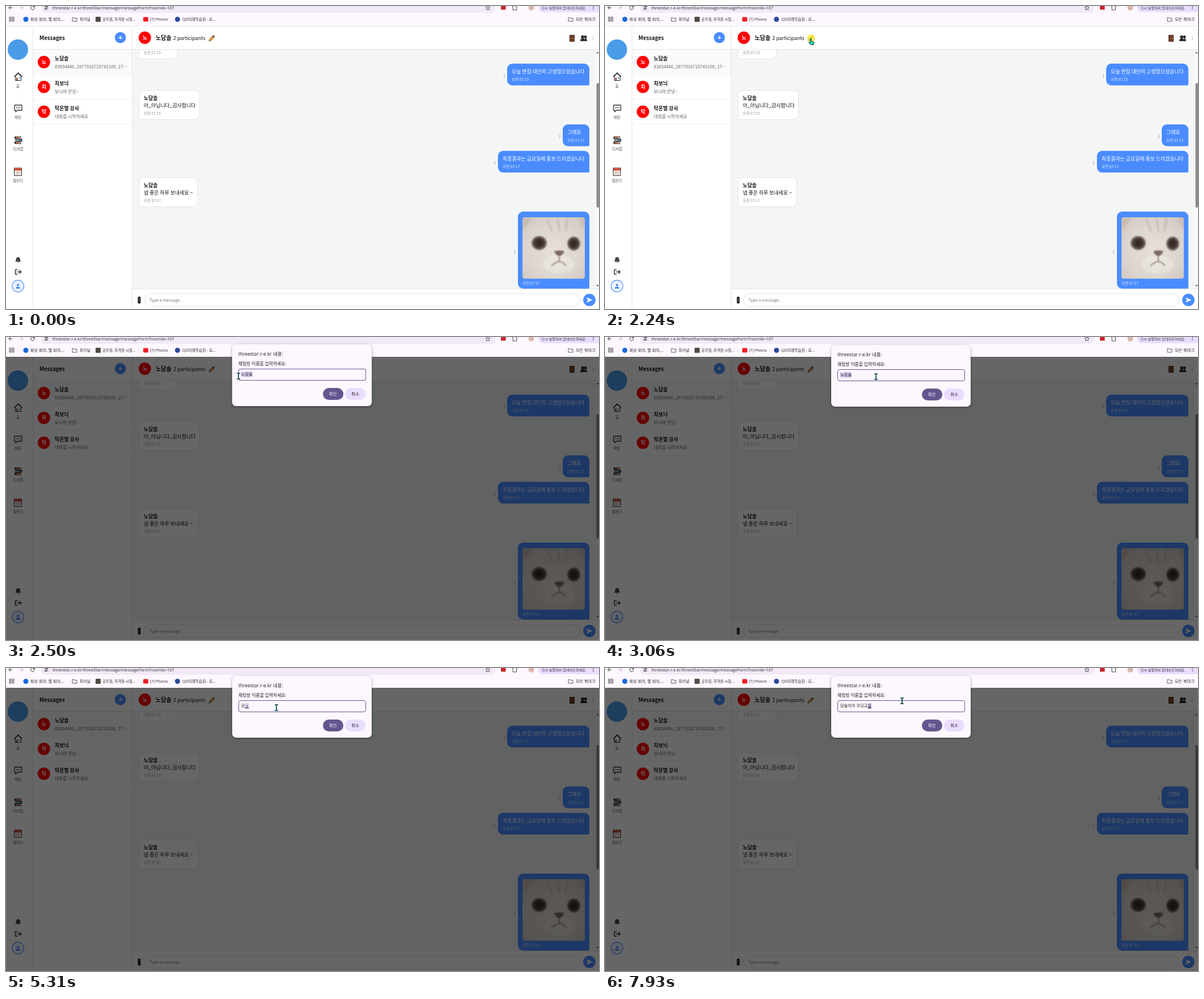
These frames come from a looping animation (1046 by 535 pixels, 8000 ms). An HTML page:

```html
<!DOCTYPE html>
<html>
<head>
<meta charset="utf-8">
<title>Chat room rename</title>
<style>
html, body { margin: 0; width: 100%; height: 100%; overflow: hidden; background: #fff; }
svg { display: block; position: absolute; left: 0; top: 0; }
body, text { font-family: 'Noto Sans CJK KR', 'Noto Sans', sans-serif; }
text { font-size: 8.88px; fill: #111; }
.bar text, #dialog { font-family: 'Open Sans', 'Noto Sans CJK KR', sans-serif; }
.bar text { font-size: 6.8px; fill: #2b2930; }
.b { font-weight: 700; }
.mid { text-anchor: middle; }
.sub { font-size: 7.75px; fill: #666; }
.w text { fill: #fff; }
.time text { font-size: 6.6px; fill: #8b8f94; }
.w .time text { fill: #e6efff; }
.nav text { font-size: 6.6px; fill: #555; text-anchor: middle; }
.line { fill: none; stroke: #333; stroke-linecap: round; stroke-linejoin: round; }
.rule { stroke: #e3e5e8; }
.blue { fill: #4a8cff; }
.in { fill: #fff; stroke: #dfe2e5; }
#dialog { position: absolute; left: 399px; top: 14px; width: 246px; height: 109px; border-radius: 7px;
  background: #fef7ff; color: #1d1b20; box-shadow: 0 1px 4px #0006; font-size: 7.4px; line-height: 10px; }
#dialog > * { position: absolute; white-space: pre; box-sizing: border-box; }
#field { left: 10.5px; top: 43px; width: 225px; height: 21px; border: 1.5px solid #65558f; border-radius: 4px;
  padding: 4px 4.5px; font-size: 7.2px; line-height: 9.5px; }
#field span { display: inline-block; height: 9.5px; vertical-align: top; }
#last { text-decoration: underline; background: #ddcdf5; }
#caret { width: 1px; background: #1d1b20; }
.btn { top: 76.5px; width: 36px; height: 21px; border-radius: 11px; text-align: center; line-height: 20px; }
</style>
</head>
<body>
<svg width="1046" height="535">
<defs>
  <g id="dots"><circle cy="-2.4" r=".65"/><circle r=".65"/><circle cy="2.4" r=".65"/></g>
  <path id="folder" d="M-4-3h3l1 1h4v5.5h-8z" fill="none" stroke="#49454f" stroke-width=".9"/>
  <radialGradient id="fur" cx=".5" cy=".55" r=".75">
    <stop offset="0" stop-color="#e6dfda"/><stop offset=".6" stop-color="#dcd5cf"/><stop offset="1" stop-color="#cac2bb"/>
  </radialGradient>
  <radialGradient id="eye"><stop offset="0" stop-color="#2b211e"/><stop offset=".65" stop-color="#493b36"/><stop offset="1" stop-color="#8d8078"/></radialGradient>
  <filter id="soft"><feGaussianBlur stdDeviation="1.2"/></filter>
  <clipPath id="chat"><path d="M223 77h823v422h-823z"/></clipPath>
  <clipPath id="photo"><rect x="911" y="373" width="110" height="108.5" rx="4"/></clipPath>
</defs>

<!-- browser bar -->
<g class="bar">
  <path d="M0 0h1046v35H0z" fill="#fef7ff"/>
  <path d="M62 0h801v6q-1 6-8 6H70q-7 0-8-6z" fill="#f1e9f6"/>
  <path d="M939 0h107v11H946q-6 0-7-7z" fill="#eaddff"/>
  <g class="line" stroke-width="1">
    <path d="M11 3H5m3-3L5 3l3 3"/>
    <path d="M24 3h6m-3-3 3 3-3 3" stroke="#bbb4c0"/>
    <path d="M50 1.5a3.4 3.4 0 1 0 .3 2.500M50.500-.5v2.500H48"/>
    <path d="M68 1.500h3m2 0h1M68 5h1m2 0h3"/><circle cx="72" cy="1.500" r="1"/><circle cx="70" cy="5" r="1"/>
    <path d="m850-.8 1.200 2.600 2.800.3-2.100 1.900.6 2.800-2.500-1.400-2.500 1.400.6-2.800-2.100-1.900 2.800-.3z" stroke-width=".8"/>
    <path d="M894 0h2q1-2 2 0h2.500v2q2 1 0 2v3H894V4.800q2-1 0-2z" stroke-width=".9"/>
  </g>
  <rect x="873" y="-1" width="8.500" height="7.500" rx="1" fill="#c9252b"/>
  <circle cx="926.500" cy="3" r="5" fill="#d9b8ae"/>
  <text x="82" y="5.800" style="font-size:7.330px">threestar.r-e.kr/threeStar/message/messageForm?roomId=107</text>
  <text x="944.500" y="5.500" style="font-size:6.200px">다시 실행하여 업데이트하세요.</text>
  <use href="#dots" x="1036" y="3"/>
  <path d="M6 19.500h3v3H6zm5 0h3v3h-3zm-5 4.500h3v3H6zm5 0h3v3h-3z" fill="none" stroke="#49454f" stroke-width=".9"/>
  <circle cx="35" cy="23.500" r="4.500" fill="#1769d9"/>
  <text x="43" y="26" style="font-size:7.100px">화상 회의, 웹 회의,...</text>
  <use href="#folder" x="121" y="23.500"/><text x="130" y="26">파이널</text>
  <rect x="158" y="19" width="9" height="9" rx="1" fill="#4d4d45"/>
  <text x="170" y="26" style="font-size:6.500px">공무원, 자격증 시험...</text>
  <rect x="242" y="19.500" width="9" height="8" rx="2" fill="#f01d24"/>
  <text x="254" y="26">(7) Plivora</text>
  <circle cx="302.500" cy="23.500" r="4.500" fill="#2c49a0"/>
  <text x="311" y="26">QD미래학습원 - 로...</text>
  <use href="#folder" x="996" y="23.500"/><text x="1005" y="26" style="font-size:7.200px">모든 북마크</text>
</g>

<!-- navigation -->
<path d="M0 35h1046v500H0z" fill="#fff"/>
<circle cx="21" cy="77" r="18" fill="#4a9be8"/>
<g class="nav">
  <path d="M16.500 124v7.500h10V124l-5-5z" fill="#fff" stroke="#222"/>
  <path d="m14.500 125 7-7 7 7" fill="none" stroke="#222" stroke-width="1.400"/>
  <path d="M18 126.500h2.500v4.500H18z" fill="#8f4a30"/><path d="M22.500 126h2.500v2.500h-2.500z" fill="#58acd6"/>
  <text x="21" y="143.500">홈</text>
  <path d="M15 175h13v9h-8l-3 3v-3h-2z" class="line" stroke-width="1.300"/>
  <g fill="#222"><circle cx="18.500" cy="179.500" r=".9"/><circle cx="21.500" cy="179.500" r=".9"/><circle cx="24.500" cy="179.500" r=".9"/></g>
  <text x="21" y="199">채팅</text>
  <path d="M15 230.500h12v4H15zm1.500 4.500h12v4h-12zM15 239.500h12v4H15z" fill="#222"/>
  <path d="M17 231.500h9v2h-9zM17 240.500h9v2h-9z" fill="#d7703d"/><path d="M18 236h9v2h-9z" fill="#4f9bc9"/>
  <path d="M22 232.500h5m-10 4.500h5m0 4.500h5" stroke="#fff"/>
  <text x="21.500" y="255">티셔럽</text>
  <path d="M14.500 286h13v13.500h-13z" fill="#f5eee9" stroke="#332c2b"/>
  <path d="M15 286.500h12v4H15z" fill="#d84a36"/>
  <path d="M17 293h8.500m-8.500 2h8.500m-8.500 2h6" stroke="#b9958c" stroke-dasharray="1.500 .8"/>
  <text x="21" y="311">캘린더</text>
</g>
<path d="M16 451.500q1.800-1.500 1.800-5 0-2.500 3-3 .5-1 1 0 3 .5 3 3 0 3.500 1.700 5zM20 452.500h3q-1.500 2-3 0z" fill="#444"/>
<path d="M20 465.500h-3.500v8H20m0-4h6.500m-2.500-2.800 2.800 2.800-2.800 2.800" class="line" stroke-width="1.500"/>
<circle cx="21.200" cy="494.500" r="10.400" fill="#edf4ff" stroke="#4a8cff" stroke-width="1.100"/>
<g class="blue"><circle cx="21.200" cy="492.500" r="2.100"/><path d="M17.200 499q0-3.500 4-3.500t4 3.500z"/></g>

<!-- room list -->
<path d="M48 77h174v44H48z" fill="#fafafb"/>
<text x="59" y="60" class="b" style="font-size:9.600px">Messages</text>
<circle cx="201.700" cy="55.800" r="9.800" class="blue"/>
<path d="M198.400 55.800h6.600m-3.300-3.300v6.600" stroke="#fff" stroke-width="1.200"/>
<g fill="#f00"><circle cx="66.900" cy="99" r="10.900"/><circle cx="66.900" cy="142.800" r="10.900"/><circle cx="66.900" cy="186.700" r="10.900"/><circle cx="244.900" cy="56" r="10.900"/></g>
<g class="w b mid"><text x="67" y="102.300">노</text><text x="67" y="146.300">차</text><text x="67" y="190.300">탁</text><text x="245" y="59.300">노</text></g>
<g class="b"><text x="86" y="95.500">노담솔</text><text x="86" y="139.500">차보늬</text><text x="86" y="183.500">탁온별 강사</text></g>
<text x="86" y="110" class="sub">83854446_2877016725745100_17⋯</text>
<text x="86" y="154" class="sub">보늬야 안녕~</text>
<text x="86" y="197.500" class="sub">대화를 시작하세요</text>

<!-- messages -->
<path d="M223 77h823v422H223z" fill="#f4f6f6"/>
<g clip-path="url(#chat)">
  <g class="in">
    <path d="M234.500 60h68v24.500a9 9 0 0 1-9 9h-57a2 2 0 0 1-2-2z"/>
    <path d="M243.500 149h89a9 9 0 0 1 9 9v33.500a9 9 0 0 1-9 9h-96a2 2 0 0 1-2-2V158a9 9 0 0 1 9-9z"/>
    <path d="M243.500 302.800h86a9 9 0 0 1 9 9v33.500a9 9 0 0 1-9 9h-93a2 2 0 0 1-2-2v-40.500a9 9 0 0 1 9-9z"/>
  </g>
  <g class="blue">
    <path d="M893 101.800h127a9 9 0 0 1 9 9v27.400a2 2 0 0 1-2 2H893a9 9 0 0 1-9-9v-20.400a9 9 0 0 1 9-9z"/>
    <path d="M991 209h29a9 9 0 0 1 9 9v27.400a2 2 0 0 1-2 2h-36a9 9 0 0 1-9-9V218a9 9 0 0 1 9-9z"/>
    <path d="M876.800 255.700H1020a9 9 0 0 1 9 9v27.400a2 2 0 0 1-2 2H876.800a9 9 0 0 1-9-9v-20.400a9 9 0 0 1 9-9z"/>
    <path d="M912 363h108a9 9 0 0 1 9 9v125a2 2 0 0 1-2 2H912a9 9 0 0 1-9-9V372a9 9 0 0 1 9-9z"/>
  </g>
  <g class="time"><text x="243" y="85">오전 07:15</text><text x="243" y="192">오전 07:15</text><text x="243" y="346">오전 07:17</text></g>
  <g class="b"><text x="243" y="165.500">노담솔</text><text x="243" y="319.500">노담솔</text></g>
  <text x="243" y="178.500">아,,아닙니다,,감사합니다</text>
  <text x="243" y="332.500">넵 좋은 하루 보내세요 ~</text>
  <g class="w">
    <text x="892" y="118.500">오늘 면접 대단히 고생많으셨습니다</text><text x="990" y="226">그래요</text><text x="876" y="272.500">최종결과는 금요일에 통보 드리겠습니다</text>
    <g class="time"><text x="892" y="132">오전 07:15</text><text x="990" y="239.500">오전 07:17</text><text x="876" y="286">오전 07:17</text><text x="911" y="491.500">오전 07:17</text></g>
  </g>
  <g fill="#666"><use href="#dots" x="879" y="123"/><use href="#dots" x="977" y="230"/><use href="#dots" x="862" y="277"/><use href="#dots" x="897" y="433.500"/></g>
  <g clip-path="url(#photo)">
    <path d="M911 373h110v109H911z" fill="url(#fur)"/>
    <g filter="url(#soft)">
      <path d="M911 373h16l-7 14-9 8zm110 0h-9l3 13 6 6z" fill="#cbbcb3"/>
      <path d="M955 376l8 22m10-24 3 24m14-24-3 24" stroke="#bdb6b1" stroke-width="4" fill="none" opacity=".6"/>
      <ellipse cx="975" cy="456" rx="28" ry="16" fill="#efe9e5" opacity=".6"/>
      <g fill="url(#eye)"><ellipse cx="940.500" cy="418.500" rx="13.500" ry="12.500"/><ellipse cx="1001.500" cy="419.500" rx="11.500" ry="12.500"/></g>
    </g>
    <g filter="url(#soft)">
      <path d="M967 433q9-3 18 0-3 7-9 9-6-2-9-9z" fill="#7d6861"/>
      <path d="M976 441v10m-14 8q7-7 14-8 7 1 12 8" fill="none" stroke="#9b8982" stroke-width="2"/>
    </g>
  </g>
</g>
<path d="M1040 77h6v422h-6z" fill="#fafafa"/>
<rect x="1041.500" y="136" width="4.500" height="220" rx="2" fill="#8b8b8b"/>
<path d="m1041 83.500 2.500-3 2.500 3zm0 409 2.500 3 2.500-3z" fill="#666"/>

<!-- room header and message field -->
<text x="264" y="60" class="b" style="font-size:10.100px">노담솔</text>
<text x="295" y="60">2 participants</text>
<path d="m358 62 1-3.500 6-6 2.500 2.500-6 6z" fill="#f0a23a" stroke="#47301f" stroke-width=".8"/>
<path d="m364 53.500 1.200-1.200q1.500-.7 2.700 1.300l-1.300 1.500z" fill="#df6b77" stroke="#47301f" stroke-width=".7"/>
<path d="M994.500 51.500h8v11h-8z" fill="#8b4d2d" stroke="#38221b"/><path d="M996.500 53.500h4v3h-4zm0 4.500h4v3h-4z" fill="#643420"/><circle cx="1001" cy="57.500" r=".8" fill="#f1b84b"/>
<g fill="#292929"><circle cx="1017" cy="54.500" r="2.700"/><circle cx="1022" cy="54.500" r="2.500"/><path d="M1013 62q0-5 4.500-5t4 5zm8.500 0v-5q3.500 0 3.500 5z"/></g>
<use href="#dots" x="1036" y="57.500" fill="#777"/>
<path d="M47.500 35v500M222.500 35v500M48 76.500h998M223 499.500h823" class="rule"/>
<path d="M48 120.500h174M48 164.500h174M48 208.500h174" stroke="#f0f1f3"/>
<path d="M0 35.500h1046" stroke="#ece6ef"/>
<rect x="232.500" y="513" width="5" height="12.500" rx="2.500" fill="#222"/><path d="M234 517h2m-2 2h2m-2 2h2" stroke="#888" stroke-width=".7"/>
<rect x="244.500" y="508" width="768" height="22" rx="11" class="in"/>
<text x="253" y="522" style="font-size:7.300px;fill:#777">Type a message...</text>
<circle cx="1029" cy="519" r="10.900" class="blue"/><path d="m1024.500 514.500 10 4.500-10 4.500 1-3.700 4-.8-4-.8z" fill="#fff"/>
<path id="scrim" d="M0 35h1046v500H0z" opacity=".6"/>
</svg>

<div id="dialog">
  <div style="left:11px;top:12px;font-size:8.400px">threestar.r-e.kr 내용:</div>
  <div style="left:11px;top:28.500px;font-size:7.750px">채팅방 이름을 입력하세요:</div>
  <div id="field"><span id="done"></span><span id="last"></span><span id="caret"></span></div>
  <div class="btn" style="left:159.500px;background:#65558f;color:#fff">확인</div>
  <div class="btn" style="left:199px;background:#eaddff">취소</div>
</div>

<svg width="1046" height="535" style="pointer-events:none">
  <circle id="click" cx="363.500" cy="57" r="7" fill="#ffeb3b" opacity=".8"/>
  <g id="pointer" stroke="#10302d" stroke-width=".9" stroke-linejoin="round" fill="#22d3b5">
    <path id="arrow" d="M0 0v10l2.300-2 1.700 3.500 1.700-.8L4.200 7.400h3.300z"/>
    <path id="hand" d="M-1 1q1-2 2 0v4l4 1q1 .5.700 2l-.9 3.500H0L-3.500 7.500q.4-1.800 2.500 0z"/>
    <path id="beam" d="M-3-5h2l1 .7 1-.7h2m-6 10h2l1-.7 1 .7h2M0-4.500v9" fill="none" stroke="#0b4a45" stroke-width="1.700"/>
  </g>
</svg>

<script>
const LOOP = 8000, OPEN = 2380;
const $ = id => document.getElementById(id);
const show = (id, on) => { $(id).style.display = on ? '' : 'none'; };
const within = (t, a, b) => t >= a && t < b;

// time, x, y of the pointer's hot spot
const path = [
  [210, 1039, 457], [440, 945, 352], [700, 825, 262], [970, 872, 204],
  [1330, 650, 150], [1780, 369, 68], [1870, 364, 64], [2240, 363, 57],
  [2379, 363, 57], [2380, 371, 59], [2500, 410, 69], [3060, 478, 70],
  [3260, 478, 70], [3460, 474.5, 69.5], [3610, 477, 70], [7929, 477, 70], [7930, 524, 58]
];

// time, characters kept from the start, characters added (jamo are composed step by step)
const keys = [
  [0, 0, '노담솔'], [4380, 2, ''], [4580, 1, ''], [4780, 0, ''],
  [4980, 0, 'ㄷ'], [5050, 0, '다'], [5130, 0, '담'],
  [5310, 1, 'ㅅ'], [5410, 1, '소'], [5510, 1, '솔'],
  [5660, 2, 'ㅇ'], [5730, 2, '이'],
  [5910, 3, 'ㅇ'], [6000, 3, '으'], [6090, 3, '의'], [6190, 4, ' '],
  [6280, 5, 'ㅋ'], [6380, 5, '코'], [6530, 5, '콛'], [6600, 5, '코디'], [6670, 6, '딩'],
  [6940, 7, 'ㄱ'], [7050, 7, '교'], [7160, 7, '굣'], [7270, 7, '교시'], [7480, 8, '실']
];

function pointerAt(t) {
  const i = path.findIndex(p => p[0] > t);
  if (i < 0) return path[path.length - 1].slice(1);
  if (i === 0) return path[0].slice(1);
  const [t0, x0, y0] = path[i - 1], [t1, x1, y1] = path[i];
  const k = (t - t0) / (t1 - t0);
  return [x0 + (x1 - x0) * k, y0 + (y1 - y0) * k];
}

function drawField(t) {
  let text = '';
  for (const [at, keep, add] of keys) if (t >= at) text = text.slice(0, keep) + add;
  const composing = t >= 4980 && !text.endsWith(' ');
  const cut = composing ? text.length - 1 : text.length;
  $('done').textContent = text.slice(0, cut);
  $('last').textContent = text.slice(cut);
  $('done').style.background = t < 3330 ? '#d9cdf0' : '';
  show('caret', within(t, 3330, 3920) || within(t, 4380, 4980) || within(t, 6190, 6280));
}

function draw(t) {
  const open = t >= OPEN;
  show('scrim', open);
  show('dialog', open);
  const k = Math.min(1, Math.max(0, (t - OPEN) / 135));
  $('dialog').style.opacity = Math.min(1, .22 + k);
  $('dialog').style.transform = `translateY(${-8.5 * (1 - k)}px) scaleX(${1 + .016 * (1 - k)})`;
  drawField(t);

  show('click', within(t, 2170, OPEN));
  show('pointer', t >= 210);
  show('arrow', t < 1870);
  show('hand', within(t, 1870, 2450));
  show('beam', t >= 2450);
  $('pointer').setAttribute('transform', `translate(${pointerAt(t)})`);
}

function tick() {
  draw(performance.now() % LOOP);
  requestAnimationFrame(tick);
}
tick();
</script>
</body>
</html>
```
